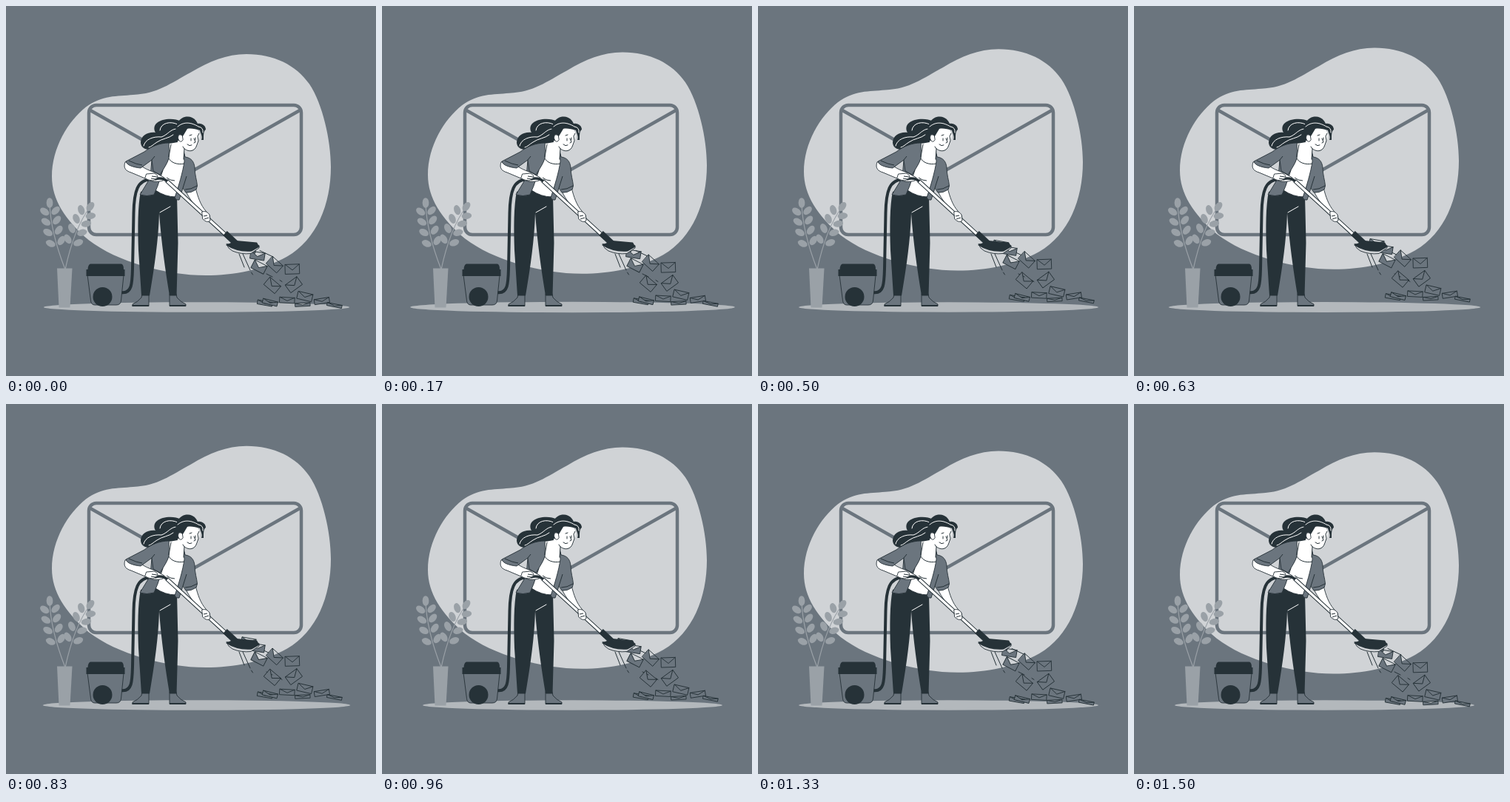
Write an HTML page that moves like this. It is 500 px wide and 500 px high and loops after 1540 ms.

```html
<!DOCTYPE html>
<html lang="en">
<head>
<meta charset="utf-8">
<title>Clearing the inbox</title>
<style>
  html, body { margin: 0; width: 100%; height: 100%; overflow: hidden; background: #6b757e; }
  svg { display: block; width: 100vw; height: 100vh; }
  .ink { fill: #263238; }
  .grey { fill: #6b757e; }
  .white { fill: #fff; }
  .line { fill: none; stroke: #263238; }
  .edge { stroke: #263238; stroke-width: .9; stroke-linejoin: round; stroke-linecap: round; }
  .shine { fill: none; stroke: #fff; stroke-width: 1; stroke-linecap: round; }
</style>
</head>
<body>
<svg viewBox="0 0 500 500">
  <rect class="grey" width="500" height="500"/>
  <path id="blob" fill="#d0d3d6" d="M325 65.3C362 65.3 392 80 410 106C428 133 439 182 439 218C439 268 420 316 380 339C348 357 308 364.5 270 364.5C215 364.5 150 346 112 317C80 290 62 262 62 231C62 192 84 156 108 137C130 121 150 122.5 172 120.5C205 119 222 105 250 90C275 75 298 65.5 325 65.3Z"/>

  <g fill="none" stroke="#6b757e" stroke-width="4.5">
    <rect x="112" y="134" width="287" height="175" rx="10"/>
    <path d="M114 141L255.5 221L397 141"/>
  </g>

  <ellipse id="floor" fill="#b3b8bc" cx="257.5" cy="407" rx="202.5" ry="6.7"/>

  <g id="plant" fill="#9aa1a7">
    <path d="M69 354.5H89.5L86.5 407.5H71.5Z"/>
  </g>

  <g id="bucket">
    <path class="line" stroke-width="4" d="M156 387C170 389 170.5 375 171 355L172.5 280C173 250 178 235 195 234.500L204 234"/>
    <path class="grey edge" d="M110.5 364H159L155.5 398Q155 404 149 404H120Q115 404 114.5 398Z"/>
    <path class="ink" d="M114 348.5H156Q159 349 159 356H160.5V365H108.5V356H110.5Q111 349 114 348.5Z"/>
    <circle class="ink" cx="130.5" cy="393" r="13"/>
  </g>

  <path class="line" stroke-linecap="round" d="M315 335L322 353M320 335L330 357M331.5 360L333.5 363M343 330.5L361 339M352 362L360 366M370 370.5L373 372.5"/>
  <g id="mail" class="grey edge"></g>

  <g id="legs">
    <path class="grey edge" d="M184 389L183 394Q178 400 171 403V405.5H193V389Z"/>
    <path class="grey edge" d="M221 389V405.5H243V403Q236 400 231 394L230 389Z"/>
    <path class="line" stroke-width="2" d="M170.5 405H193M221 405H243"/>
    <path class="ink" d="M182 251C178 270 178 300 179 330L183 391.5H194C201 350 206 315 207 280C210 320 215 355 221 391.5H230.5L232.5 320L231 256L203 247Z"/>
    <path class="shine" d="M208 279L222 271"/>
  </g>

  <g id="hair">
    <path class="ink" d="M236 156C228 151 211 152 204 158C199 162 200 168 202 171C191 170 183 175 182 184C182 192 190 196 199 193C208 191 213 186 220 185L232 187L237 169Z"/>
    <path class="shine" d="M232 160C222 155 209 158 208 168M231 166C222 166 219 174 210 177C199 176 188 180 186 189M226 174C220 179 211 179 204 184C199 187 197 190 193 191"/>
  </g>

  <g id="torso">
    <path class="white edge" d="M220 185L205 225L202 249Q215 258 230 258L240 225L243 208L238 191Z"/>
    <path class="line" d="M219 204C222 212 232 215 241 213M217 232Q222 236 228 236"/>
    <path class="grey edge" d="M197 208L195 232L181 255Q190 258 200 255L205 243L212 222Z"/>
    <path class="white edge" d="M161 211C158 219 162 223 169 225L188 233C195 238 205 238 212 236L214 232L205 227C198 223 190 222 181 215Z"/>
    <path class="grey edge" d="M220 185C207 185 196 190 187 197L162 210C163 215 172 218 182 219L197 208L199 223L208 228C213 220 218 213 220 206Z"/>
    <path class="line" d="M197 208L201 203M166 209Q176 214 184 215"/>
    <path class="white edge" d="M243 250C248 262 256 270 264 279L273 290Q277 289 275 283L270 277C263 269 259 258 256 245Z"/>
    <path class="grey edge" d="M239 191L242 204C250 205 254 210 255 218C255 228 258 236 258.5 243L257 248Q250 253 243 252L239 246L234 262Q230 263 228 259C233 244 239 225 241 210Z"/>
    <path class="line" d="M239 246L244 230M242 248Q250 248 258 243"/>
  </g>

  <g id="head">
    <path class="white" d="M232 172C233 164 245 161 255 163L262 172C261 180 260 187 257 191C253 197 246 197 241 194L240 207Q232 211 221 204L221 186L232 184Z"/>
    <path class="line" stroke-linecap="round" d="M261 172L259 176L260 182L257.500 189C255 196 248 198 241 193L239 190M241 193L240 207M223 187L220 204M250 179V182M256 178V181M254 179L256 184L254 185M245 187Q248 190 251 188M248 175L251 174"/>
    <path class="ink" d="M230 174C227 160 235 149 246 149.5C253 150 257 154 259 159C265 158 270 162 270 167C267 169 267 173 267 181L264 181C266 176 263 173 262 168C256 166 249 165 245 166C242 171 239 176 235 182L232 182Z"/>
    <path class="shine" d="M232 163C241 155 252 158 260 163Q267 164 266 171"/>
    <path class="white edge" d="M238 175C233 171 231 178 234 182Q237 185 239 181Z"/>
  </g>

  <g id="wand">
    <path class="line" stroke-width="3.5" d="M201 234Q212 231 219 238L224 243"/>
    <path class="line" stroke-width="5.4" d="M217 236L302 314"/>
    <path class="shine" style="stroke-width: 3.4; stroke-linecap: butt" d="M218 237L300 312"/>
    <path class="white edge" d="M190 227L201 226Q206 229 205 232L199 236Q193 236 188 233Z"/>
    <path class="white edge" d="M265 278Q271 276 275 282L276 290Q272 294 266 288Z"/>
    <path class="line" d="M197 230L204 231M196 233L202 234M267 284L272 283M268 288L274 286"/>
    <path class="line" stroke-width="8" d="M296 307L311 321"/>
    <path class="edge" fill="#d0d3d6" d="M298 322Q300 328 306 331Q318 336 331 334.5L342 327V324Z"/>
    <path class="ink" d="M297 323L311 317L339 319.5L342.5 325.5L332 331.5Q312 333 297 323Z"/>
  </g>
</svg>
<script>
const LOOP = 1540, CYCLE = 1500, LEAD = 30;
const $ = id => document.getElementById(id);

function add(parent, name, attrs) {
  const el = document.createElementNS("http://www.w3.org/2000/svg", name);
  for (const key in attrs) el.setAttribute(key, attrs[key]);
  parent.appendChild(el);
}

const place = (x, y, turn) => `translate(${x} ${y}) rotate(${turn})`;

// A curved stem with leaf pairs set square to it
function branch(tip, bend, base) {
  const plant = $("plant");
  const leaf = (x, y, turn) =>
    add(plant, "ellipse", { rx: 6.8, ry: 4.4, transform: place(x, y, turn) });
  add(plant, "path", {
    d: `M${tip}Q${bend} ${base}`, fill: "none", stroke: "#9aa1a7", "stroke-width": 1.2
  });
  const mix = (i, s) => (1 - s) ** 2 * tip[i] + 2 * s * (1 - s) * bend[i] + s * s * base[i];
  const slope = (i, s) => (1 - s) * (bend[i] - tip[i]) + s * (base[i] - bend[i]);
  const angle = s => Math.atan2(slope(1, s), slope(0, s));
  leaf(...tip, angle(0) * 180 / Math.PI);
  for (let s = 0.14; s < 0.7; s += 0.16) {
    const a = angle(s), deg = a * 180 / Math.PI;
    for (const side of [-1, 1])
      leaf(mix(0, s) - side * 7.5 * Math.sin(a), mix(1, s) + side * 7.5 * Math.cos(a), deg - side * 50);
  }
}
branch([59, 266], [60, 305], [80, 356]);
branch([114, 271], [92, 300], [80, 356]);

function letter(x, y, turn, w, h) {
  const a = w / 2, b = h / 2;
  add($("mail"), "path", {
    d: `M${-a} ${-b}H${a}V${b}H${-a}ZL0 ${b * 0.2}L${a} ${-b}`,
    transform: place(x, y, turn)
  });
}

// x, y, angle
const flying = [[328, 329, 10], [340, 338, 9], [342, 353, 27], [363, 350, 42],
  [387, 356, -2], [360, 378, 40], [389, 377, -36]];
const fallen = [[350, 402, 10], [357, 401, 14], [380, 398, 3], [404, 393, 13],
  [401, 404, -3], [427, 399, -9], [444, 405, 11]];
flying.forEach(([x, y, turn], i) => letter(x, y, turn, 19, Math.min(13, 8 + 2 * i)));
// Letters lower on the floor are seen flatter
fallen.forEach(([x, y, turn]) => letter(x, y, turn, 20, 4 + (405 - y) * 0.5));

// Two linear beats, then rest
function beat(p) {
  const pulse = (from, peak, to) =>
    Math.max(0, Math.min((p - from) / (peak - from), (to - p) / (to - peak)));
  return 1 + 0.1 * (pulse(0, 0.1, 0.3) + pulse(0.4, 0.5, 0.6));
}

function draw(ms) {
  const p = Math.min(1, (ms % LOOP + LEAD) / CYCLE);
  const lift = -10 * (1 - Math.abs(2 * p - 1));
  for (const id of ["blob", "mail"]) $(id).setAttribute("transform", `translate(0 ${lift})`);
  $("floor").setAttribute("transform", `translate(257.5 407) scale(${beat(p)}) translate(-257.5 -407)`);
}

const start = performance.now();
function tick() {
  draw(performance.now() - start);
  requestAnimationFrame(tick);
}
draw(0);
requestAnimationFrame(tick);
</script>
</body>
</html>
```
